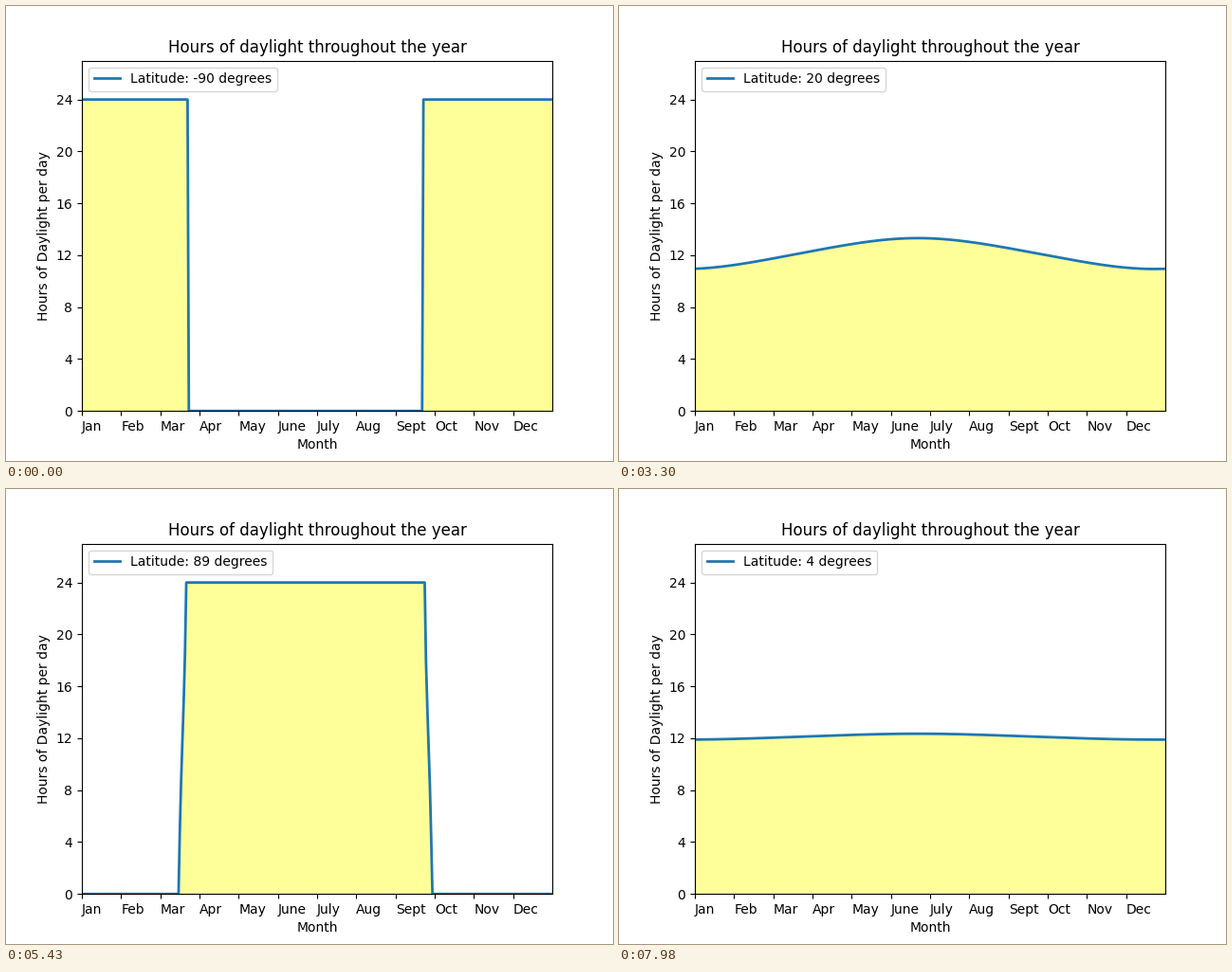
A matplotlib script that plays this animation: 640x480 px, repeating every 8000 ms.

```python
import numpy as np
import matplotlib.pyplot as plt
from matplotlib.animation import FuncAnimation

LOOP_MS = 8000
FRAMES = 267
TILT = 0.392      # sine of the largest solar declination
HORIZON = 0.8333  # degrees the sun may sit below the horizon
MONTHS = ["Jan", "Feb", "Mar", "Apr", "May", "June",
          "July", "Aug", "Sept", "Oct", "Nov", "Dec"]

days = np.arange(366)


def daylight(latitude):
    """Hours of daylight for every day of the year."""
    lat = np.radians(latitude)
    theta = 0.2163108 + 2 * np.arctan(
        0.9671396 * np.tan(0.0086 * (days - 186)))
    decl = np.arcsin(TILT * np.cos(theta))
    ratio = ((np.sin(np.radians(HORIZON)) + np.sin(lat) * np.sin(decl))
             / (np.cos(lat) * np.cos(decl)))
    return 24 - 24 / np.pi * np.arccos(np.clip(ratio, -1, 1))


def area(hours):
    xs = np.concatenate([[days[0]], days, [days[-1]]])
    return np.column_stack([xs, np.concatenate([[0], hours, [0]])])


def label(latitude):
    return f"Latitude: {latitude} degrees"


fig, ax = plt.subplots(figsize=(6.4, 4.8), dpi=100)
start = daylight(-90)
fill, = ax.fill(*area(start).T, color="#ffff99", linewidth=0)
line, = ax.plot(days, start, color="#1f77b4", linewidth=2, label=label(-90))

ax.set_xlim(0, 365)
ax.set_ylim(0, 27)
ax.set_xticks(np.arange(12) * 365 / 12)
ax.set_xticklabels(MONTHS, ha="left")
ax.set_yticks(range(0, 25, 4))
ax.set_title("Hours of daylight throughout the year")
ax.set_xlabel("Month")
ax.set_ylabel("Hours of Daylight per day")
caption = ax.legend(loc="upper left").get_texts()[0]


def update(i):
    # One degree per step: south pole to north pole, then back
    latitude = 90 - abs(i - 180)
    hours = daylight(latitude)
    line.set_ydata(hours)
    fill.set_xy(area(hours))
    caption.set_text(label(latitude))
    return line, fill, caption


anim = FuncAnimation(fig, update, frames=FRAMES, interval=LOOP_MS / FRAMES,
                     repeat=True, repeat_delay=0, blit=False)
plt.show()
```
